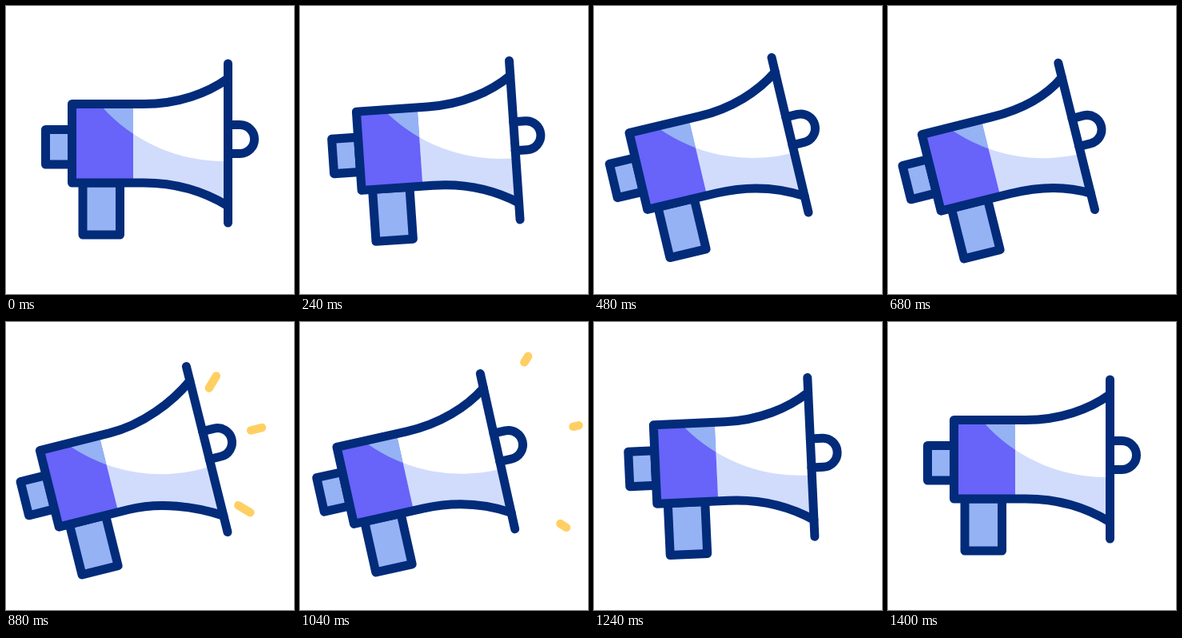
Recreate the animation shown at these times as an HTML page with a canvas. Size 360x360 px, loop 1.44 s.

```html
<!DOCTYPE html>
<html lang="en">
<head>
<meta charset="utf-8">
<title>Megaphone</title>
<style>
  html, body { margin: 0; overflow: hidden; background: #fff; }
  canvas { display: block; }
</style>
</head>
<body>
<canvas width="360" height="360"></canvas>
<script>
const ctx = document.querySelector('canvas').getContext('2d');
const LOOP = 1440, STEP = 40;
const NAVY = '#022b7a', PURPLE = '#6863f9', BLUE = '#95b2f4', PALE = '#d1dcfc', YELLOW = '#ffcf63';
const PIVOT = [217.5, 305], MAX_TILT = 14 * Math.PI / 180;
const SPARKS = [[293, 111.5, 48, -48], [329, 162, 55, 0], [293, 235.5, 48, 48]];

// Eased 0..1 progress of time t between a and b
function ramp(t, a, b) {
  const u = Math.min(1, Math.max(0, (t - a) / (b - a)));
  return u * u * (3 - 2 * u);
}

function stroke(path, color = NAVY, width = 11) {
  ctx.strokeStyle = color;
  ctx.lineWidth = width;
  ctx.stroke(new Path2D(path));
}

function fillRect(color, x, y, w, h) {
  ctx.fillStyle = color;
  ctx.fillRect(x, y, w, h);
}

function box(x, y, w, h) {
  fillRect(BLUE, x, y, w, h);
  stroke(`M${x} ${y}h${w}v${h}h${-w}z`);
}

function drawHorn(dx, dy) {
  const x = 277.5 + dx, top = 90.5 - dy, bottom = 250 + dy;
  const outline = `M${x} ${top}C${252 + dx * .7} ${109 - dy * .7} 215 122.5 172 122.5H82.5V221H172` +
    `C212 221 ${248 + dx * .7} ${232 + dy * .7} ${x} ${bottom}`;

  ctx.save();
  ctx.clip(new Path2D(outline + 'z'));
  fillRect(PALE, 159, 70, 150, 200);
  fillRect(PURPLE, 82, 122, 77, 100);
  ctx.beginPath();
  ctx.arc(272, -10, 204, 0, 2 * Math.PI);
  ctx.clip();
  fillRect('#fff', 159, 70, 150, 200);
  fillRect(BLUE, 82, 70, 77, 152);
  ctx.restore();

  stroke(outline);
  stroke(`M${x} 148.5h15a18 18 0 0 1 0 36h-15`);
  stroke(`M${x} ${72 - dy}V${271 + dy}`);
}

function drawSparks(t) {
  const head = ramp(t, 680, 1060), tail = ramp(t, 745, 1130);
  if (head <= 0 || tail >= 1) return;
  for (const [x, y, w, h] of SPARKS) {
    stroke(`M${x + w * tail} ${y + h * tail}L${x + w * head} ${y + h * head}`, YELLOW, 10.5);
  }
}

function draw(t) {
  const tilt = ramp(t, 80, 540) - ramp(t, 965, 1345);
  const squash = ramp(t, 540, 680) - ramp(t, 680, 850);
  const stretch = ramp(t, 680, 850) - ramp(t, 880, 1030);

  fillRect('#fff', 0, 0, 360, 360);
  ctx.save();
  ctx.lineCap = ctx.lineJoin = 'round';
  ctx.translate(...PIVOT);
  ctx.rotate(-tilt * MAX_TILT);
  ctx.translate(-PIVOT[0], -PIVOT[1]);
  drawSparks(t);
  box(49.5, 154.5, 33, 43.5);
  box(96, 221, 46.5, 65);
  drawHorn(8 * (stretch - squash), 7.2 * stretch - 5 * squash);
  ctx.restore();
}

const start = performance.now();
function tick() {
  const t = (performance.now() - start) % LOOP;
  draw(Math.floor(t / STEP) * STEP);
  requestAnimationFrame(tick);
}
tick();
</script>
</body>
</html>
```
